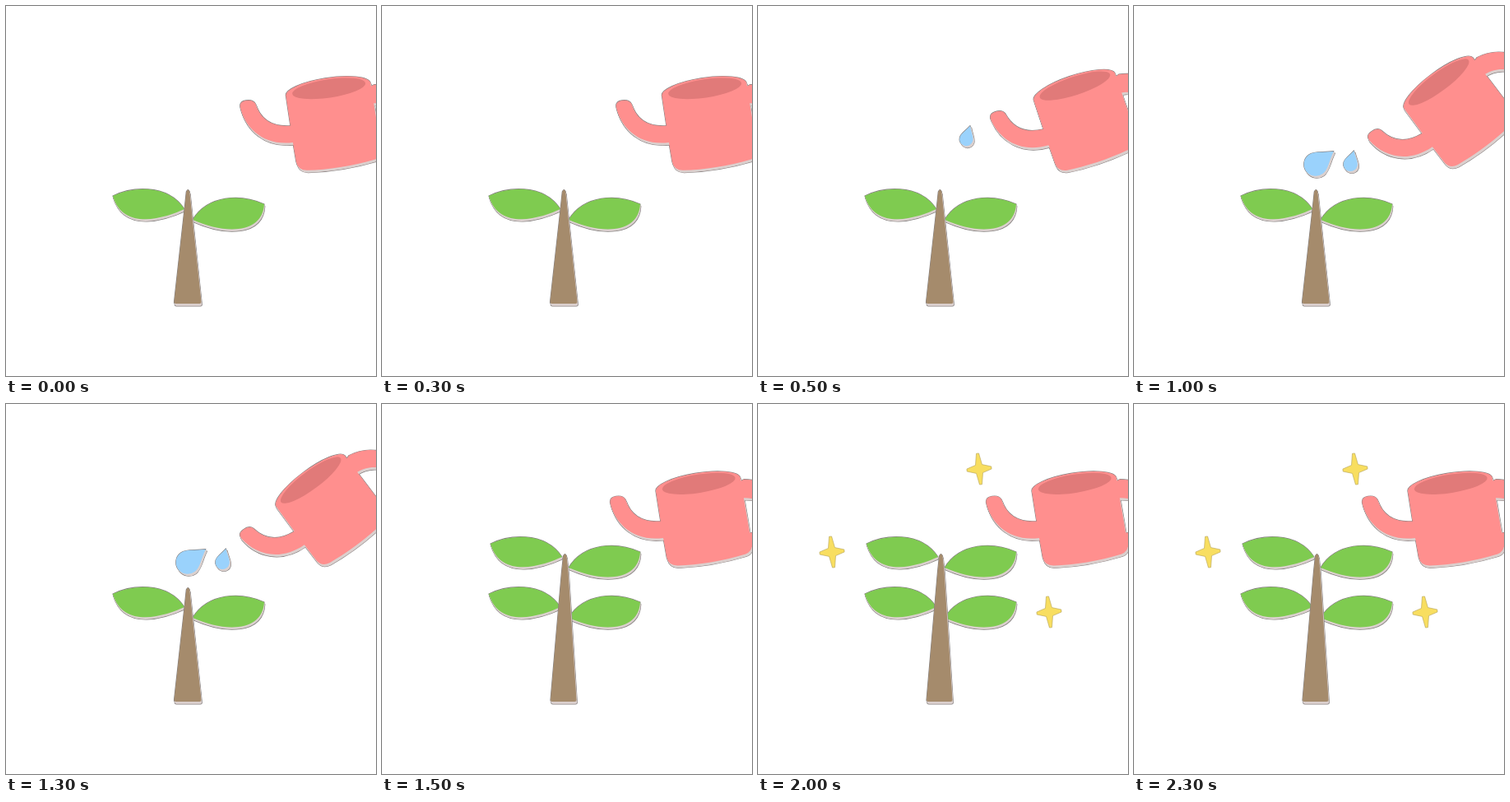
An HTML page that plays this animation: 450x450 px, repeating every 2500 ms.

```html
<!DOCTYPE html>
<html>
<head>
<meta charset="utf-8">
<style>
html, body { margin: 0; width: 100%; height: 100%; overflow: hidden; background: #fff; }
svg { display: block; width: 100vw; height: 100vh; }
</style>
</head>
<body>
<svg id="stage" viewBox="0 0 450 450"></svg>
<script>
const PINK = '#ff8f8e', INSIDE = '#e17a79', GREEN = '#7fcb50', BROWN = '#a58b6c',
      BLUE = '#9ad2fc', YELLOW = '#f8de60', SHADE = '#dbd0ce', EDGE = '#858080';
const STEP = 500, COUNT = 5;
const stage = document.getElementById('stage');

// A flat cut-out: thin edge, pale side showing below, coloured face on top.
function cutout(d, fill, place = '', dx = 1.2, dy = 2.8) {
  const shape = style => `<path d="${d}" transform="${place}" ${style}/>`;
  const line = `fill="none" stroke="${EDGE}" stroke-width="1.2" stroke-linejoin="round"`;
  const side = `fill="${SHADE}"`;
  const shift = (s, k) => `<g transform="translate(${dx * k} ${dy * k})">${s}</g>`;
  return shape(line) + shift(shape(line), 1) + shift(shape(side), 1) +
    shift(shape(side), 0.5) + shape(`fill="${fill}"`);
}

const CAN = 'M-52 3A52 14 0 0 1 52 2L53 84Q53 93 44 95C15 99-15 99-40 96Q-51 94-51.5 84' +
  'L-52 60C-88 59-107 34-109 8Q-109 1-101 1Q-92 1-90 7C-86 30-70 38-52 39.5Z' +
  'M50 7L56 5C76 8 100 24 100 50C100 80 75 90 50 88V70C70 72 82 66 82 52C82 38 66 28 50 27Z';

function can(x, y, angle) {
  const place = `translate(${x} ${y}) rotate(${angle})`;
  return cutout(CAN, PINK, place) +
    `<ellipse cx="1" cy="1.5" rx="45" ry="11.2" fill="${INSIDE}" transform="${place}"/>`;
}

function leaves(x, y) {
  const left = 'M130 231C150 221 195 214 217 247C197 256 143 276 130 231Z';
  const right = 'M227 260C245 230 285 228 314 241C312 277 267 278 227 260Z';
  return cutout(left, GREEN, `translate(${x} ${y})`, 0.8, 2.6) +
    cutout(right, GREEN, `translate(0 ${y})`, 0.8, 2.6);
}

function trunk(x, top, l, r) {
  return cutout(`M${x - 2} ${top + 3}Q${x} ${top - 2} ${x + 2} ${top + 3}` +
    `L${x + 4} ${top + 22}L${r} 360Q${r} 362 ${r - 2} 362H${l + 2}Q${l} 362 ${l} 360` +
    `L${x - 4} ${top + 22}Z`, BROWN, '', 0.8, 2.8);
}

function drop(x, y, r, h, angle) {
  const d = `M0 ${-h}C${r * 0.45} ${-h * 0.55} ${r} ${-r * 0.6} ${r} 0A${r} ${r} 0 0 1 ${-r} 0` +
    `C${-r} ${-r * 0.6} ${-r * 0.45} ${-h * 0.55} 0 ${-h}Z`;
  return cutout(d, BLUE, `translate(${x} ${y}) rotate(${angle})`, 1.6, 2.4);
}

function sparkle(x, y) {
  const d = 'M-1.5-19H1.5L4-5L15-1.5V1.5L4 5L1.5 19H-1.5L-4 5L-15 1.5V-1.5L-4-5Z';
  return `<path d="${d}" transform="translate(${x} ${y}) rotate(-6)" fill="${YELLOW}" ` +
    `stroke="#b5a45c" stroke-width=".6"/>`;
}

const sprout = leaves(0, 0) + trunk(221.3, 223, 204.5, 237.5);
const grown = leaves(0, 0) + leaves(2, -61) + trunk(222.5, 182, 205, 236.5);
const upright = can(384, 95.5, -9);

const scenes = [
  sprout + can(391.5, 99, -8.5),
  sprout + can(384, 96, -18.3) + drop(253.3, 162, 8.2, 17, 16),
  sprout + can(369, 92, -36.5) + drop(221, 192.5, 14.3, 27, 54) + drop(263.3, 192.5, 8.6, 17, 14),
  grown + upright,
  grown + upright + sparkle(269, 79) + sparkle(90, 180) + sparkle(354, 253)
];

stage.innerHTML = scenes.map(s => `<g display="none">${s}</g>`).join('');
const groups = [...stage.children];
let shown = -1;

function draw(t) {
  const i = Math.floor(t / STEP) % COUNT;
  if (i === shown) return;
  groups.forEach((g, k) => g.setAttribute('display', k === i ? 'inline' : 'none'));
  shown = i;
}

const start = performance.now();
function tick() {
  draw(performance.now() - start);
  requestAnimationFrame(tick);
}
tick();
</script>
</body>
</html>
```
